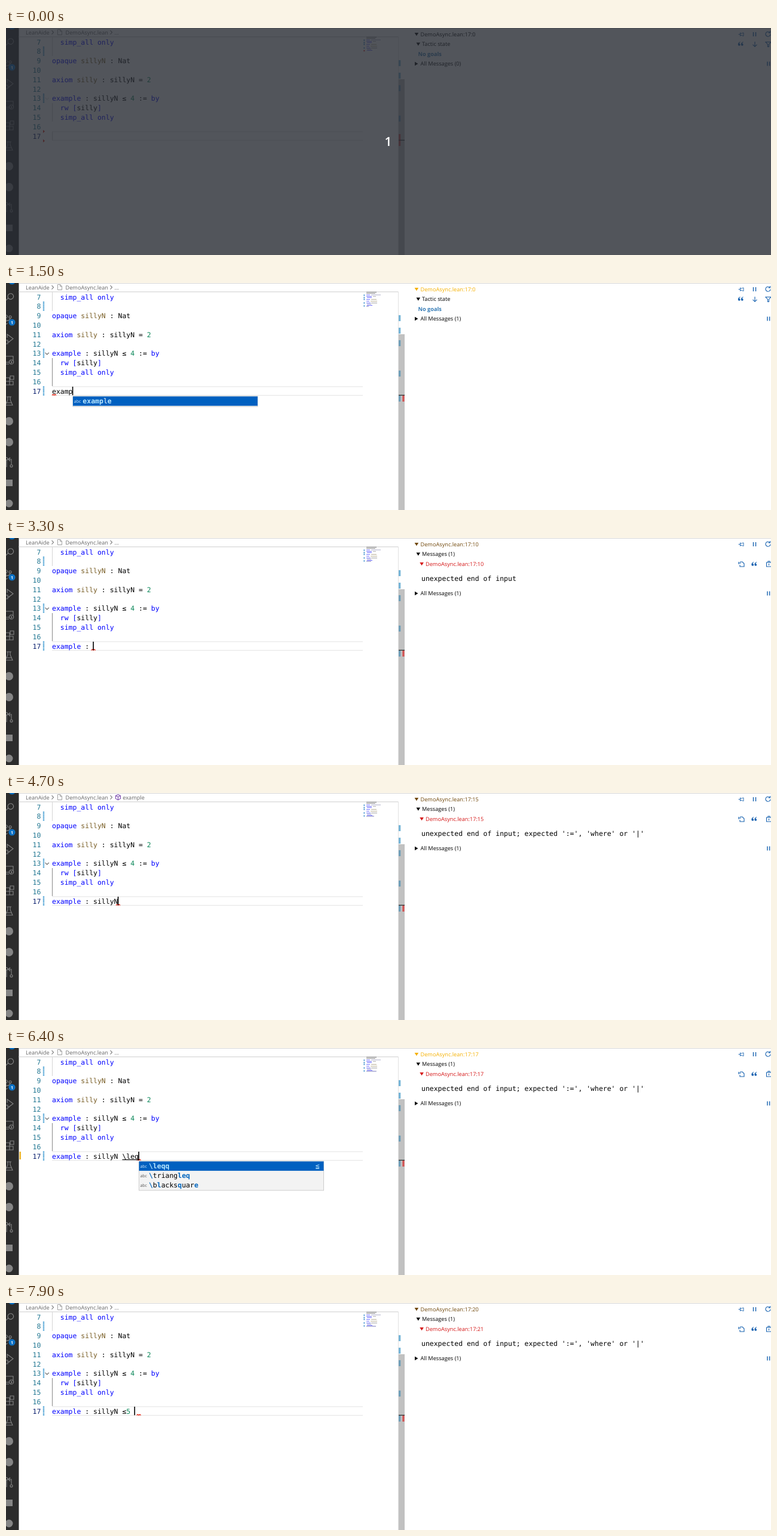
An HTML page for the animation above (8000 ms loop, 1280 by 381 pixels).

```html
<!DOCTYPE html>
<html lang="en">
<head>
<meta charset="utf-8">
<title>Lean editor typing</title>
<style>
  html, body { margin: 0; width: 100%; height: 100%; overflow: hidden; background: #fff; }
  svg { display: block; width: 100%; height: 100%; }
  text { white-space: pre; font: 9.2px "Open Sans", sans-serif; text-rendering: geometricPrecision; }
  .code { font: 11.48px "DejaVu Sans Mono", monospace; }
  .line { fill: none; stroke-width: 1.1; }
</style>
</head>
<body>
<svg id="stage" viewBox="0 0 1280 381"></svg>
<script>
const LOOP = 8000, LEFT = 77, CHAR = 6.912, ROW = 15.8, BASE = 185.6;
const BLUE = '#0000ff', UI_BLUE = '#1762b0', ORANGE = '#f5b000', BROWN = '#70470a', RED = '#d51616';

const col = n => LEFT + n * CHAR;
const rowY = n => BASE - (17 - n) * ROW;
const rect = (x, y, w, h, fill, extra = '') =>
  `<rect x="${x}" y="${y}" width="${w}" height="${h}" fill="${fill}" ${extra}/>`;
const path = (d, stroke, extra = '') => `<path class="line" d="${d}" stroke="${stroke}" ${extra}/>`;
const shape = (d, fill) => `<path d="${d}" fill="${fill}"/>`;
const circle = (x, y, r, fill) => `<circle cx="${x}" cy="${y}" r="${r}" fill="${fill}"/>`;
const text = (x, y, s, fill = '#000', extra = '') => `<text x="${x}" y="${y}" fill="${fill}" ${extra}>${s}</text>`;
const code = (x, y, s, fill = '#000', extra = '') => text(x, y, s, fill, `class="code" ${extra}`);
const span = (s, fill, extra = '') => `<tspan fill="${fill}" ${extra}>${s}</tspan>`;
const down = (x, y, fill = '#000') => shape(`M${x} ${y - 2.6}h6.6l-3.3 5.4z`, fill);
const right = (x, y) => shape(`M${x} ${y - 3.3}l5.4 3.3l-5.4 3.3z`, '#000');

// Last entry whose time has come.
const pick = (t, steps) => steps.reduce((now, s) => t >= s[0] ? s : now, steps[0]);

const paint = s => s.replace(
  /(?<=opaque |axiom )\w+|\b(?:example|opaque|axiom|by|rw|simp_all|only)\b|[\[\]]|\d+/g,
  m => span(m, /^\d/.test(m) ? '#098658' : /^silly/.test(m) ? '#795e26' : BLUE));

const LINES = ['  simp_all only', '', 'opaque sillyN : Nat', '', 'axiom silly : sillyN = 2', '',
  'example : sillyN ≤ 4 := by', '  rw [silly]', '  simp_all only', ''];

const HEAD = 'example : sillyN ';
const TYPED = [[0, ''], [700, 'e'], [1100, 'ex'], [1300, 'exa'], [1400, 'exam'], [1500, 'examp'],
  [1700, 'exampl'], [1800, 'example'], [2000, 'example '], [2900, 'example :'], [3100, 'example : '],
  [3800, 'example : s'], [3900, 'example : si'], [4000, 'example : sil'], [4100, 'example : sill'],
  [4300, 'example : silly'], [4700, 'example : sillyN'], [5200, HEAD], [5600, HEAD + '\\'],
  [6100, HEAD + '\\l'], [6200, HEAD + '\\le'], [6400, HEAD + '\\leq'], [6600, HEAD + '≤'],
  [7000, HEAD + '≤5'], [7200, HEAD + '≤5 ']];

const STATUS = [[0, 0, '#000'], [800, 0, ORANGE], [2400, 8, BROWN], [2900, 8, ORANGE], [3200, 10, BROWN],
  [3800, 10, ORANGE], [4500, 15, BROWN], [4800, 15, ORANGE], [5100, 16, BROWN], [5200, 16, ORANGE],
  [5500, 17, BROWN], [6100, 17, ORANGE], [7400, 20, BROWN]];
const ERROR_COL = [[0, 8], [3200, 10], [4500, 15], [5100, 16], [5500, 17], [7400, 21]];
const SYMBOL = [[0, 0], [2400, 1], [3000, 0], [4500, 1], [5500, 0], [7400, 1], [7700, 0]];

const EX = 'example exact exists exit export extends ext exfalso except expose'.split(' ');
const ABBR = 'le leq l lam lambda lt ldots left land lor lnot leqq'.split(' ').map(s => '\\' + s);
const MENU = [[0, []], [1200, EX], [1300, EX.slice(0, 2)], [1400, EX.slice(0, 1)], [2000, []],
  [5700, ABBR], [6400, ['\\leqq', '\\triangleq', '\\blacksquare']], [6600, []]];

function icons() {
  const g = '#858585', p = d => path(d, g, 'stroke-width="1.4"');
  return rect(0, 0, 21.5, 381, '#2c2c2c')
    + shape('M5 0h10q-2 2.5-5 2.5t-5-2.5z', '#0a6fc2')
    + p('M-1 30L4 25M3 22a4.8 4.8 0 1 1 3 5a4.8 4.8 0 0 1-3-5')
    + p('M2 55a2.2 2.2 0 1 1-4 0a2.2 2.2 0 0 1 4 0M0 57.5v8M9 57a2 2 0 1 1-4 0a2 2 0 0 1 4 0M7 59.5q-1 4-7 4M2 67a2 2 0 1 1-4 0')
    + circle(10, 66, 5.6, '#0a70c4') + text(10, 68.6, '1', '#fff', 'text-anchor="middle" style="font-size:7px;font-weight:700"')
    + p('M2 92V86l10 7.5l-8 6M-1 96h4v6h-4M3 99h3')
    + p('M0 123h12v8M0 133h5M-1 136h6M9 129a3.6 3.6 0 1 0 .1 0M8 131l2 2l-2 2')
    + p('M0 159h6v6H0M6 165h6v6H0M6 165v6M7 156h6v6H7z')
    + p('M1 191h8M3 191v5l-4 9h12l-4-9v-5M0 201h9')
    + circle(5, 232, 7, g) + circle(5, 267, 7, g)
    + p('M1 297v12M3 295a2 2 0 1 1-4 0a2 2 0 0 1 4 0M9 301v4M11 307a2 2 0 1 1-4 0a2 2 0 0 1 4 0M9 303v-7H5M7 293l-3 3l3 3')
    + rect(0, 330, 11, 11, g) + circle(5, 370, 6.5, g);
}

function minimap(t) {
  const rows = [[603, 15, 17, '#333'], [603, 17, 15, '#333'], [603, 19.5, 6, BLUE], [611, 19.5, 16, '#67679c'],
    [603, 22, 9, BLUE], [614, 22, 5, '#777'], [604, 24, 8, BLUE], [603, 27, 6, BLUE], [611, 27, 9, '#807045'],
    [603, 30, 5, BLUE], [610, 30, 11, '#807045'], [603, 33, 7, BLUE], [611, 33, 10, '#555'],
    [604, 35, 7, '#55a'], [604, 37, 9, BLUE]];
  const ticks = [20, 24, 27, 33].map(y => rect(598.5, y - .5, 1.7, 2, '#2783c7')).join('');
  return rows.map(([x, y, w, c]) => rect(x, y, w, 1, c, 'opacity=".55"')).join('') + ticks
    + (t < 700 ? rect(598.5, 37, 1.7, 2.3, '#e02020') : rect(598.5, 37.5, 1.7, 2, '#2783c7')
      + rect(603, 38.5, Math.max(1, typed(t).length * .8), 1.1, '#55a', 'opacity=".7"'));
}

const typed = t => pick(t, TYPED)[1];
const hatch = n => path(`M63 ${rowY(n) - 12.2}v${ROW}`, '#3b98d0', 'style="stroke-width:2.4;stroke-dasharray:1.5 .8"');

function backdrop() {
  let s = rect(0, 0, 1280, 381, '#fff') + icons();
  LINES.forEach((line, i) => {
    const n = i + 7;
    s += code(58.3, rowY(n), n, '#237893', 'text-anchor="end"') + code(LEFT, rowY(n), paint(line));
  });
  s += code(58.3, BASE, 17, '#0b216f', 'text-anchor="end"') + hatch(8) + hatch(13)
    + path('M77.5 15V47', '#d6d6d6')
    + rect(21.5, 14, 635, 1.5, '#dedede') + rect(21.5, 0, 1258.5, 1, '#d8d8d8')
    + text(33, 10.6, 'LeanAide', '#666') + path('M76.5 4l3 3.3l-3 3.3M174.5 4l3 3.3l-3 3.3', '#777')
    + path('M86.5 2.5h4.2l2.8 2.8v6.2h-7zM90.5 2.5v3h3', '#888', 'style="stroke-width:.8"')
    + text(99.5, 10.6, 'DemoAsync.lean', '#666')
    + path('M656.5 15V381', '#e2e2e2') + rect(657, 86, 10, 295, '#c1c1c1');
  [54, 75].forEach(y => s += rect(657, y, 3.3, 10, '#76b5d8'));
  [96, 147].forEach(y => s += rect(657, y, 3.3, 10, '#6f9eb8'));
  return s;
}

const pause = y => path(`M1274 ${y - 3.5}v7M1277.6 ${y - 3.5}v7`, UI_BLUE, 'style="stroke-width:1.4"');
const quote = (x, y) => [0, 5].map(d =>
  shape(`M${x + d + 3.2} ${y - 4}q-3.4 1.6-3.4 5a1.9 1.9 0 1 0 2-2q0-1.3 1.9-2.2z`, UI_BLUE)).join('');

function topIcons() {
  return path('M1225.5 10.7h3M1228.5 7.7v6M1228.5 9h3q1-1 2.5-1v5.4q-1.5 0-2.5-1h-3', UI_BLUE, 'style="stroke-width:.9"')
    + path('M1250.5 7v7M1254.5 7v7', UI_BLUE, 'style="stroke-width:1.4"')
    + path('M1278 7.6a4 4 0 1 0 1 3M1278.5 5v3h-3', UI_BLUE);
}

function messages(t, dy) {
  const c = pick(t, ERROR_COL)[1], y = n => n + dy;
  const tail = t >= 3200 && t < 4500 ? '' : "; expected ':=', 'where' or '|'";
  return down(686.5, y(27)) + text(696, y(30.4), 'Messages (1)')
    + down(692.3, y(43.5), RED) + text(702, y(47), 'DemoAsync.lean:17:' + c, RED)
    + path(`M1228 ${y(40)}h4l3 3v5h-7v-3M1226 ${y(42)}h4M1226 ${y(40)}v4`, UI_BLUE) + quote(1247.5, y(44))
    + path(`M1272.5 ${y(41)}h8v7h-8zM1275 ${y(41)}v-2h3v2M1276.5 ${y(46)}v-3`, UI_BLUE)
    + code(695, y(72.2), 'unexpected end of input' + tail)
    + right(684, y(93)) + text(693.5, y(96.4), 'All Messages (1)') + pause(y(93));
}

function panel(t) {
  const [, c, color] = pick(t, STATUS);
  const s = down(683.6, 10.5, color) + text(693.5, 13.8, 'DemoAsync.lean:17:' + c, color) + topIcons();
  if (t >= 7500 && t < 7800)
    return s + down(686.5, 27) + text(696, 30.4, 'Expected type') + code(690, 54, '⊢ Nat') + messages(t, 43);
  if (t >= 2400) return s + messages(t, 0);
  return s + down(686.5, 27) + text(696, 30.4, 'Tactic state')
    + quote(1225, 27) + path('M1253 23v8M1249.5 27.8l3.5 3.5l3.5-3.5', UI_BLUE)
    + path('M1271 23.5h9l-3.5 4v4h-2v-4z', UI_BLUE)
    + text(689.5, 46.8, 'No goals', '#367cb6', 'style="font-weight:700"')
    + right(684, 60) + text(693.5, 63.4, `All Messages (${t < 900 ? 0 : 1})`) + pause(60);
}

function menu(t, line) {
  const items = pick(t, MENU)[1];
  if (!items.length) return '';
  const x = col(line.length), word = line.split(' ').pop();
  let s = rect(x + .4, 190, 309, items.length * ROW + 1.6, '#f3f3f3', 'stroke="#c8c8c8" stroke-width=".9"')
    + rect(x + .4, 190.4, 309, ROW - .1, '#0060c0');
  items.forEach((item, i) => {
    const y = 201.9 + i * ROW, ink = i ? '#000' : '#fff', hit = i ? '#0066bf' : '#bbe7ff';
    const letters = [...item].map(c =>
      word.includes(c) ? span(c, hit, 'font-weight="700"') : c).join('');
    s += text(x + 2.3, y - 1, 'abc', i ? '#555' : '#dcecff', 'style="font-size:7px"') + code(x + 16.8, y, letters, ink);
  });
  return word === '\\leq' ? s + code(x + 295.5, 201.9, '≦', '#bbe7ff') : s;
}

function squiggle(t, line) {
  if (t < 900) return '';
  const x = t < 2500 ? LEFT : col(line.length + (t >= 7500) - .5);
  return path(`M${x} 188.5l1.7-1.6l1.8 1.6l1.7-1.6l1.7 1.6`, '#e51400');
}

function editor(t) {
  const line = typed(t), x = col(line.length), edited = t >= 700;
  const fade = Math.min(1, .2 + Math.max(0, t - 100) / 500);
  let s = path('M77 174H597M77 188.5H597', '#e4e4e4') + (edited ? '' : path('M77.5 174V188.5', '#d4d4d4'))
    + path(`M77.5 126V${edited ? 173 : 157}`, '#8f8f8f', `opacity="${.25 + fade * .75}"`)
    + path('M65.5 116.8l3.2 3.2l3.2-3.2', '#666', `opacity="${fade}"`)
    + (edited ? hatch(17) : shape('M62 171l3 2.6l-3 2.6zM62 186.8l3 2.6l-3 2.6z', '#e02a1a'))
    + (t >= 5600 && t < 7000 ? rect(22.5, 174, 2.5, 13, '#edb52b') : '');
  s += edited
    ? rect(657, 188, 3.3, 11, '#6f9eb8') + rect(663.3, 188, 3.3, 11, '#d35454')
    : rect(657, 178, 3.3, 20, '#c25555');
  s += rect(657, 187.7, 10, 1.3, '#333') + minimap(t);
  s += pick(t, SYMBOL)[1]
    ? path('M187.5 2.5l4 2v5l-4 2.2l-4-2.2v-5zM183.5 4.5l4 2l4-2M187.5 6.5v5', '#7a49ad') + text(195.3, 10.6, 'example', '#666')
    : text(181.5, 10.6, '…', '#666');
  s += code(LEFT, BASE, paint(line)) + squiggle(t, line);
  if (line.includes('\\')) s += path(`M${col(HEAD.length)} 187.5H${x}`, '#000');
  if (t >= 500) s += rect(x - .8, 174, 1.6, 14.3, '#000');
  return s + menu(t, line);
}

function overlay(t) {
  return t >= 100 ? '' : rect(0, 0, 1280, 381, 'rgb(39,43,51)', 'opacity=".8"')
    + text(639.5, 198, '1', '#fff', 'text-anchor="middle" style="font-size:21px;font-weight:600"');
}

const stage = document.getElementById('stage');
stage.innerHTML = backdrop() + '<g id="live"></g>';
const live = document.getElementById('live');
const start = performance.now();
let shown = '';

function draw(now) {
  const t = Math.floor(Math.max(0, now - start) % LOOP / 100) * 100;
  const next = editor(t) + panel(t) + overlay(t);
  if (next !== shown) live.innerHTML = shown = next;
  requestAnimationFrame(draw);
}
draw(start);
</script>
</body>
</html>
```
